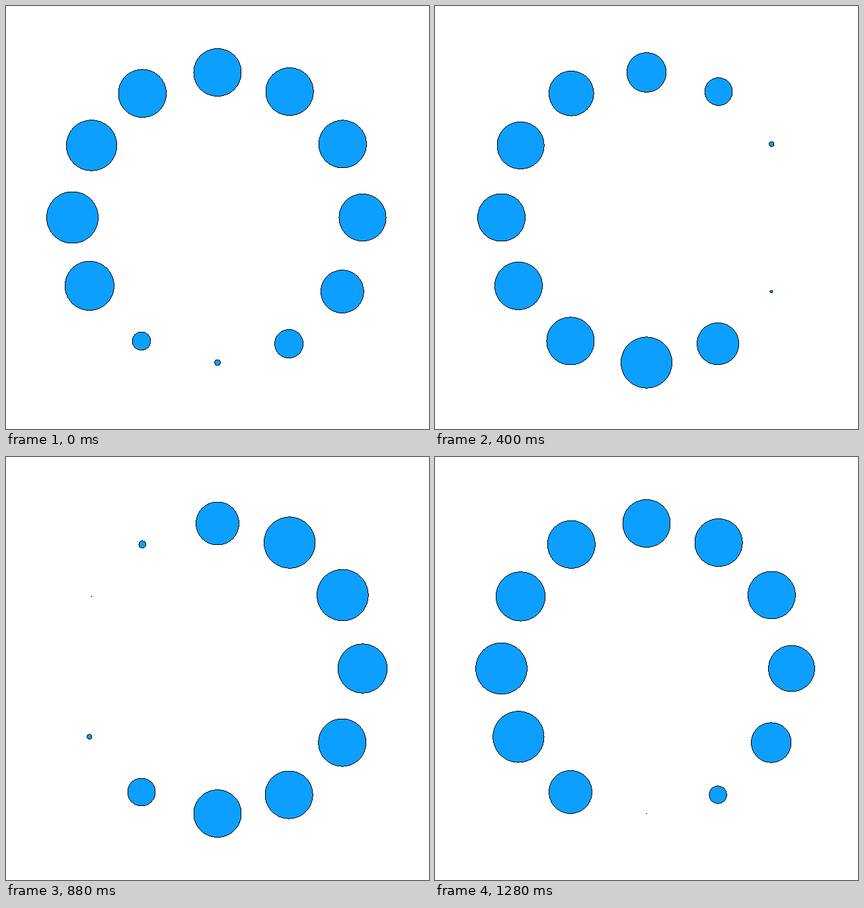
An HTML page with a canvas for the animation above (1.32 s loop, 640x640 px).

```html
<!DOCTYPE html>
<html lang="en">
<head>
<meta charset="utf-8">
<title>Ring of pulsing dots</title>
<style>
  html, body { margin: 0; width: 100%; height: 100%; overflow: hidden; background: #fff; }
  canvas { display: block; width: 640px; height: 640px; }
</style>
</head>
<body>
<canvas id="stage" width="640" height="640"></canvas>
<script>
const ctx = document.getElementById("stage").getContext("2d");

const SIZE = 640, CENTER = SIZE / 2, RING = 219.5;
const STEP_MS = 40, LOOP_STEPS = 33, PULSE_STEPS = 31;
const REST = 73, PEAK = 79;

// Clockwise from the lower left; the dots are spaced slightly unevenly.
const ANGLES = [121.6, 151.9, 180, 209.8, 238.8, 270, 299.8, 329.6, 0, 30.7, 60.5, 90];

const clamp = (v, lo, hi) => Math.min(hi, Math.max(lo, v));

// Ease curve with flat ends and horizontal handles at x1 and x2.
function ease(x, x1, x2) {
  let lo = 0, hi = 1;
  for (let i = 0; i < 24; i++) {
    const s = (lo + hi) / 2, q = 1 - s;
    if (3 * q * q * s * x1 + 3 * q * s * s * x2 + s ** 3 < x) lo = s; else hi = s;
  }
  return lo * lo * (3 - 2 * lo);
}

const tween = (t, t0, t1, from, to, x1, x2) =>
  from + (to - from) * ease((t - t0) / (t1 - t0), x1, x2);

// One pulse: settle from the peak, rest, shrink away, grow back.
function diameterAt(step) {
  const peak = 3, settled = 8, shrink = 13, gone = 24.9;
  const t = peak + (step - peak + PULSE_STEPS) % PULSE_STEPS;
  if (t < settled) return tween(t, peak, settled, PEAK, REST, 0.5, 0.58);
  if (t < shrink) return REST;
  if (t < gone) return tween(t, shrink, gone, REST, 0, 0.91, 0.64);
  return tween(t, gone, peak + PULSE_STEPS, 0, PEAK, 0.955, 0.283);
}

// Hard-edged disc with a one-pixel outline, drawn row by row.
function drawDot(cx, cy, radius) {
  const span = y => {
    const h = Math.sqrt(Math.max(0, radius ** 2 - (y + 0.5 - cy) ** 2));
    return [Math.round(cx - h), Math.round(cx + h)];
  };
  const bottom = Math.round(cy + radius);
  for (let y = Math.round(cy - radius); y < bottom; y++) {
    const [left, right] = span(y);
    const [upLeft, upRight] = span(y - 1);
    const [downLeft, downRight] = span(y + 1);
    const from = Math.max(left + 1, upLeft, downLeft);
    const to = Math.min(right - 1, upRight, downRight);
    ctx.fillStyle = "#000";
    ctx.fillRect(left, y, right - left, 1);
    ctx.fillStyle = "#0d9fff";
    if (to > from) ctx.fillRect(from, y, to - from, 1);
  }
}

function draw(ms) {
  const step = Math.floor(ms / STEP_MS) % LOOP_STEPS;
  ctx.fillStyle = "#fff";
  ctx.fillRect(0, 0, SIZE, SIZE);
  ANGLES.forEach((degrees, i) => {
    const angle = degrees * Math.PI / 180;
    // Two steps apart, with a longer gap before the last few dots.
    const phase = 2 * i - 1 + clamp(i - 8.1, 0, 1.9);
    drawDot(CENTER + RING * Math.cos(angle), CENTER + RING * Math.sin(angle),
      diameterAt(step + phase) / 2);
  });
}

const start = performance.now();
function tick() {
  draw(performance.now() - start);
  requestAnimationFrame(tick);
}
tick();
</script>
</body>
</html>
```
